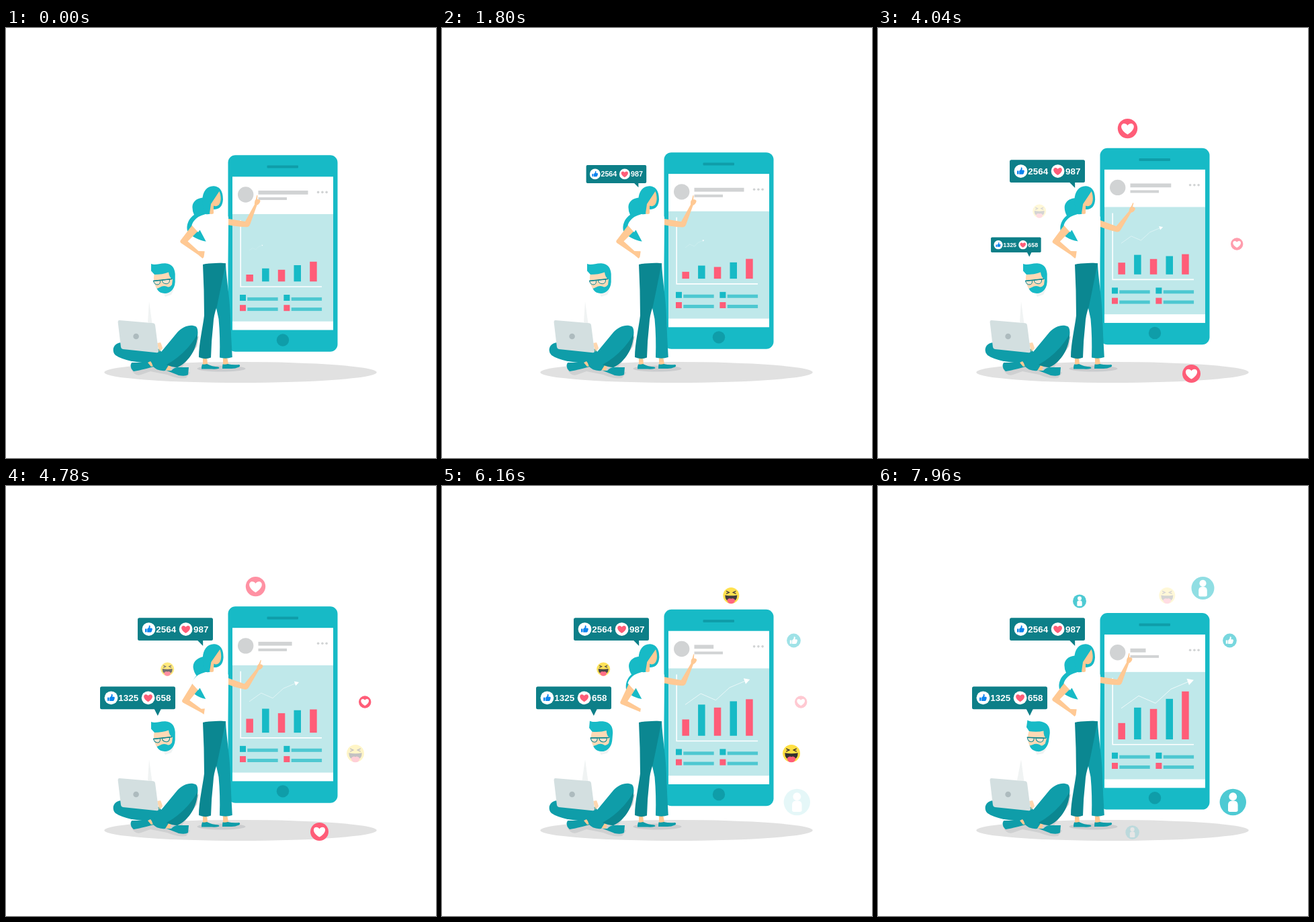
Recreate the animation shown at these times as an HTML page. Size 640x640 px, loop 8000 ms.

```html
<!DOCTYPE html>
<html lang="en">
<head>
<meta charset="utf-8">
<title>Phone statistics</title>
<style>
html, body { margin: 0; width: 100%; height: 100%; overflow: hidden; background: #fff; }
svg { display: block; width: 100vw; height: 100vh; }
text { font: bold 13.4px "Liberation Sans", Arial, sans-serif; fill: #fff; }
.teal { fill: #17bac6; }
.mid { fill: #0f9da9; }
.dark { fill: #0b8791; }
.pink { fill: #ff5d78; }
.skin { fill: #ffc994; }
.grey { fill: #d1d3d4; }
.white { fill: #fff; }
.bar { fill: #4dc8d1; }
.bubble { fill: #0d7f88; }
.line { fill: none; stroke: #fff; }
</style>
</head>
<body>
<svg viewBox="0 0 640 640">
  <ellipse cx="349" cy="512.5" rx="202.7" ry="15.5" fill="#e1e1e1"/>

  <g id="phone">
    <rect class="teal" x="330.5" y="189.3" width="163" height="292.5" rx="11"/>
    <rect class="mid" x="388.5" y="204.6" width="46.5" height="4" rx="1"/>
    <rect class="white" x="337" y="221.3" width="150" height="228.2"/>
    <circle class="mid" cx="412" cy="464.5" r="9.2"/>
    <rect x="337" y="277" width="150" height="159.7" fill="#bfe8ea"/>
    <circle class="grey" cx="356.7" cy="248" r="11.7"/>
    <rect class="grey" id="title" x="375.5" y="242" height="5.8"/>
    <rect class="grey" x="375.5" y="252" width="42.5" height="4"/>
    <g class="grey">
      <circle cx="464.6" cy="244.4" r="1.8"/><circle cx="470.9" cy="244.4" r="1.8"/><circle cx="477.1" cy="244.4" r="1.8"/>
    </g>
    <path class="line" d="M349.2 286V385H470" stroke-width="1.6"/>
    <g id="trend">
      <path class="line" d="M0 0L26-18.5L51-7.5L74-28.5L100-39.5" stroke-opacity=".75"/>
      <path class="white" d="M97.5-44L108-42L101-34.5Z"/>
    </g>
    <g id="bars"></g>
    <g id="legend"></g>
  </g>

  <ellipse cx="320.5" cy="507" rx="36" ry="4.5" fill="#cbccce"/>
  <g id="woman">
    <path class="skin" d="M293 489H299L300 500L304 504H293ZM323 489H329L331 500L335 504H323Z"/>
    <path class="mid" d="M292 500.5Q296 501 299 500Q307 504 316 504.5Q319 506 316 507Q312 508 306 507.5H291Q291 503 292 500.5ZM322.5 500.5Q327 501 330 500Q338 502 347 501Q349.5 502.5 347 504.5Q340 507.5 334 507H322Q322 503 322.5 500.5Z"/>
    <path class="mid" d="M327 350C328 375 333 400 334 430Q335 460 336.8 490Q327 493 318 490.5Q319 460 316.5 433L312 412L318 352Z"/>
    <path class="dark" d="M293 352Q309 347 326.8 350.5C322 375 318 395 314 414Q309 428 308.5 440Q305.5 466 305 490.5Q296 494 287 490C287 470 293 445 295 428Q295 390 293 352Z"/>
    <path class="teal" id="tail" d="M303 254C292 250 279 254 277.5 265Q277 272 280 278C271 284 268 295 270 302C276 311 287 316 298 317.7L290 290L297 277Q303 270 303 254Z"/>
    <path class="skin" id="backArm" d="M279 291L259.5 316.5Q258.5 318.5 260.5 320L286 337.5L292.5 343L297 338.5Q298.5 334.5 295.5 332.3L286.5 332L270.5 317.5L287 301Z"/>
    <path class="skin" id="foreArm" d="M322 282.5L356 288L370 262.5Q369.5 257 371.8 255L373.3 248.8L374.4 249.2L374 255Q378 254.5 378.5 257.5Q377.5 262 373.5 263.8L363.2 292.5Q362 296 358 296.2C346 296 334 294 322 291.5Z"/>
    <path class="white" d="M291 279L303 275L312 277L327 278L331 281V294L330 349L293 351L297.8 318L288.5 300.5L286 304L276.5 293.5C279 286 285 281 291 279Z"/>
    <g id="womanHead">
      <path class="teal" d="M293 264C290 247 297 235 309 235.2C321 236 323 247 323 255C322.5 265 318 270 309 270L305 276Q301 278 297 277Z"/>
      <path class="skin" d="M317.5 243C320 249 321 259 316.5 263.5Q313 266.5 309 264.5V276Q306 278 303 276L305 262Z"/>
    </g>
  </g>

  <g id="man">
    <path d="M187 508Q191 519 201 516L215 511L240 516Q256 523 268 521L274 513L262 505L284 474L287 458L240 500Z" fill="#cfd0d1"/>
    <path id="fold" fill="#f0f3f3"/>
    <path class="mid" d="M173 468C160 468 156 480 163 487C174 495 196 498 214 499L246 500L228 478Z"/>
    <path class="mid" d="M187 498Q183 505 190 511Q203 509 220 504L214 498ZM238 509.5L246 510Q251 504.5 257 505H272L271 516Q267 519 257 517Z"/>
    <path class="skin" d="M211 498L215 496L220 503L216 504ZM238 502L246 503L244 510L238 509Z"/>
    <path class="mid" d="M217 499L255 453C263 444 275 440 283 444.5Q287 449 284.5 462C280 482 269 499 255 505L242 502L237 510Q226 511 219 504Z"/>
    <path class="dark" d="M285 456C285 476 273 497 255 505Q247 505 239 501Q268 485 285 456Z"/>
    <path class="skin" d="M225 469L230 468Q233 475 233 477L228 482Z" fill-opacity=".75"/>
    <path d="M169 435L219 439.3Q221.5 439.6 222 442L227 481Q227 483.5 224.5 483.2L174 478Q171.5 477.6 171 475L166.6 438Q166.5 434.8 169 435Z" fill="#d3dfe0"/>
    <circle cx="193.6" cy="459" r="4.3" fill="#adbbbe"/>
    <g id="manHead">
      <path d="M234 394L250 389L246 397L237 400Z" fill="#f0f3f3"/>
      <path class="teal" d="M216 351C222 354 228 350 237 350.2C247 351 251 357 251.7 366V378C251 390 243 395 237 395C229 395 225 391 223.5 385L221 367L216 361.5Z"/>
      <path d="M220.5 367Q233 367 242 363.5Q243 372 248 374L247 382Q243 387 240 385Q234 382.5 229 386L224.5 388Q218 378 220.5 367Z" fill="#ffd9b5"/>
      <path d="M219.5 376.5L229.5 375.5Q230 381.5 226 382Q221 382.500 219.5 376.5ZM232 375.2L243.500 374Q244 380 239.5 380.7Q233 381.2 232 375.2Z" fill="#e8eee9" fill-opacity=".5" stroke="#0b8791"/>
      <path d="M219 376.500L247 373.500" stroke="#0b8791" stroke-width="1.5"/>
    </g>
  </g>

  <g id="bubbles"></g>
  <g id="icons"></g>
</svg>
<script>
const LOOP = 8000, STEP = 112;
const $ = id => document.getElementById(id);
const move = (id, value) => $(id).setAttribute("transform", value);
const svg = (parent, markup) => {
  parent.insertAdjacentHTML("beforeend", markup);
  return parent.lastElementChild;
};

// Progress from 0 to 1 between two times: straight, eased, or there and back.
const ramp = (t, from, to) => Math.min(1, Math.max(0, (t - from) / (to - from)));
const ease = (t, from, to) => (1 - Math.cos(Math.PI * ramp(t, from, to))) / 2;
const swing = (t, from, to) => Math.sin(Math.PI * ramp(t, from, to)) ** 2;

// Glyphs fit a circle of radius 10 around the origin.
const heart = "M0 6C-9 .5-6.8-5-3.4-5C-1.6-5-.5-4 0-3C.5-4 1.6-5 3.4-5C6.8-5 9 .5 0 6Z";
const thumb = "M-5.5-.5H-3V4.5H-5.5ZM-2.3-.3L0-2.6L.4-5.5C2.3-6 2.7-4 1.7-1.6H4.3Q5.7-1 5.2.6L4.2 3.7Q3.8 4.8 2.3 4.7H-2.3Z";
const person = "M-3.7 2Q-3.7-1.2 0-1.2T3.7 2V6Q3.7 7.4 2.3 7.4H-2.3Q-3.7 7.4-3.7 6Z";
const glyphs = {
  heart: `<circle class="pink" r="10"/><path class="white" d="${heart}"/>`,
  thumb: `<circle class="teal" r="10"/><path class="white" d="${thumb}"/>`,
  person: `<circle class="teal" r="10"/><circle class="white" cy="-4.2" r="3"/><path class="white" d="${person}"/>`,
  laugh: `<circle r="10" fill="#ffdf43"/>
    <path d="M-6-5.5L-2.5-3.8L-6-2.2M6-5.5L2.5-3.8L6-2.2" fill="none" stroke="#3b3432" stroke-width="1.1"/>
    <path d="M-7.5-.5Q0 1 7.5-.5Q7.5 7.5 0 7.5T-7.5-.5Z" fill="#34302f"/>
    <path class="pink" d="M-5 5.5Q-2.5 2.5 0 4Q2.5 2.5 5 5.5Q4.5 10.2 0 10.2T-5 5.5Z"/>`
};

// Reactions in order of appearance; each starts a fixed beat after the one before.
const icons = [
  ["heart", 371.5, 149.6, 14.7],
  ["heart", 466.5, 514.5, 13.5],
  ["heart", 534.2, 321.5, 9.2],
  ["laugh", 240.2, 272.5, 10],
  ["laugh", 520, 398, 13],
  ["laugh", 430.3, 163, 12],
  ["thumb", 523.5, 230, 10.4],
  ["person", 528.3, 470.5, 19.7],
  ["person", 300, 171.4, 10],
  ["person", 483.5, 152, 17],
  ["person", 378.6, 515.5, 10.3]
].map(([kind, x, y, r], i) => ({
  start: 2080 + 555 * i,
  peak: kind === "thumb" || kind === "person" ? .76 : 1,
  el: svg($("icons"), `<g transform="translate(${x} ${y}) scale(${r / 10})">${glyphs[kind]}</g>`)
}));
const fade = (t, start) => ramp(t, start, start + 1400) - ramp(t, start + 2300, start + 3300);

const bubbles = [
  { x: 196, y: 196.3, ox: 289, oy: 234.5, likes: 2564, loves: 987, tip: "M88.5 33L97.2 41.7V33Z", from: 0, to: 2240 },
  { x: 140, y: 298.5, ox: 224, oy: 337.5, likes: 1325, loves: 658, tip: "M80.5 33L85.8 43.5L91 33Z", from: 2860, to: 4620 }
].map(b => ({ ...b, el: svg($("bubbles"), `<g><g transform="translate(${b.x} ${b.y})">
  <rect class="bubble" width="112" height="33.7" rx="2.5"/><path class="bubble" d="${b.tip}"/>
  <circle class="white" cx="16.5" cy="16.8" r="9.9"/><path d="${thumb}" transform="translate(16.5 16.8)" fill="#0c84ee"/>
  <circle class="white" cx="71.6" cy="16.8" r="9.9"/><path class="pink" d="${heart}" transform="translate(71.6 16.8)"/>
  <text x="27.3" y="21.6">${b.likes}</text><text x="83" y="21.6">${b.loves}</text></g></g>`) }));

const bars = [[10.3, 24.3], [19.5, 47.3], [17.5, 45.3], [24.3, 60.3], [29.5, 71.5]].map(([low, high], i) => ({
  low, high,
  start: 1800 + 475 * i,
  el: svg($("bars"), `<rect class="${i % 2 ? "teal" : "pink"}" x="${357.4 + 23.7 * i}" width="10.5"/>`)
}));

for (const x of [348, 413.4]) {
  ["teal", "pink"].forEach((color, row) => {
    const y = 397 + row * 15.2;
    svg($("legend"), `<rect class="${color}" x="${x}" y="${y}" width="9" height="9"/>`);
    svg($("legend"), `<rect class="bar" x="${x + 11.3}" y="${y + 3.9}" width="45.4" height="5"/>`);
  });
}

function draw(t) {
  const lift = 5.3 * (1 - Math.cos(2 * Math.PI * t / 8300));
  move("phone", `translate(0 ${-lift})`);
  move("trend", `translate(362 331) scale(${.19 + .81 * ease(t, 300, 8000)})`);
  $("title").setAttribute("width", 74 - 51 * ease(t, 2400, 7200));
  for (const { el, low, high, start } of bars) {
    const h = low + (high - low) * ease(t, start, start + 4400);
    el.setAttribute("y", 377.3 - h);
    el.setAttribute("height", h);
  }

  const sway = swing(t, 3500, 7000);
  move("tail", `rotate(${-14.5 * sway} 303 262)`);
  move("womanHead", `rotate(${2 * sway} 306 276)`);
  move("foreArm", `rotate(${11.5 * swing(t, 1500, 6800)} 320 285)`);
  move("backArm", `rotate(${-13 * swing(t, 3700, 7960)} 286 292)`);

  const nod = ease(t, 4600, 7300);
  move("manHead", `translate(${.8 * nod} 0) rotate(${8 * nod} 236 390)`);
  $("fold").setAttribute("d", `M213 407L217.5 440L${211 - 4 * nod} 438Z`);

  for (const { el, from, to, ox, oy } of bubbles) {
    el.setAttribute("transform", `translate(${ox} ${oy}) scale(${ramp(t, from, to)}) translate(${-ox} ${-oy})`);
  }
  for (const { el, start, peak } of icons) el.setAttribute("opacity", peak * fade(t, start));
}

const begin = performance.now();
function tick() {
  const t = (performance.now() - begin) % LOOP;
  draw(Math.floor(t / STEP) * STEP);
  requestAnimationFrame(tick);
}
tick();
</script>
</body>
</html>
```
